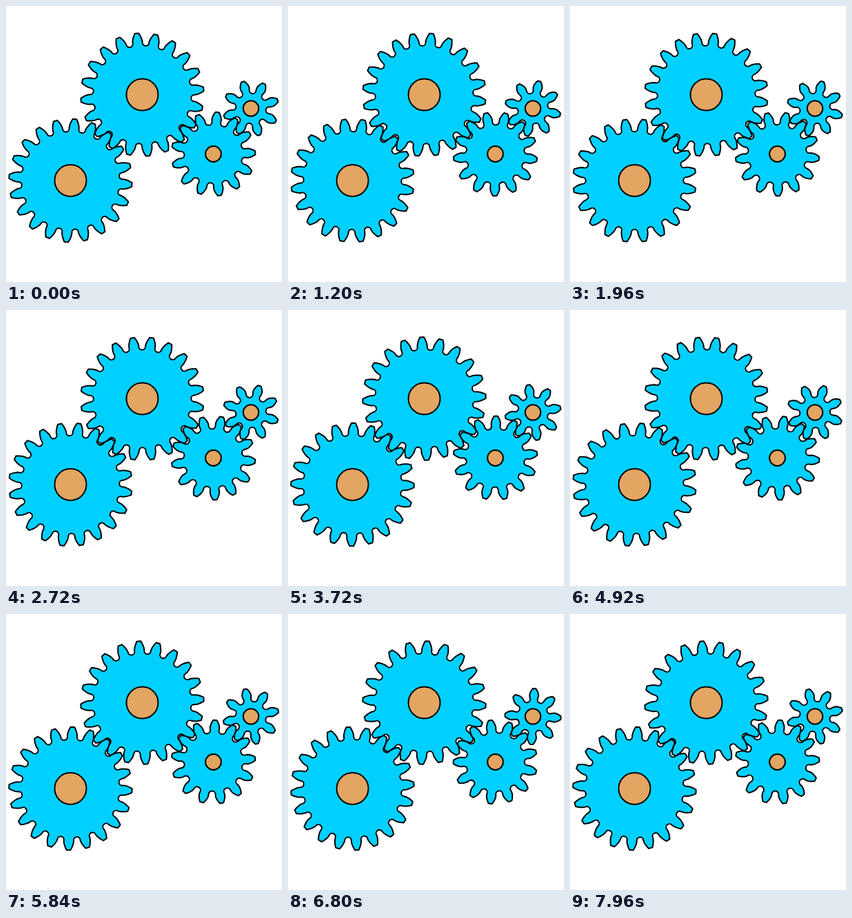
An HTML page that plays this animation: 400x400 px, repeating every 8 s.

```html
<!DOCTYPE html>
<html lang="en">
<head>
<meta charset="utf-8">
<title>Gear train</title>
<style>
  html, body { margin: 0; width: 100%; height: 100%; overflow: hidden; background: #fff; }
  svg { display: block; width: 100%; height: 100%; }
</style>
</head>
<body>
<svg id="stage" viewBox="0 0 400 400" stroke="#000" stroke-width="2" stroke-linejoin="round"></svg>
<script>
const STEP = 40, STEPS = 200;
const MODULE = 8.11, PRESSURE = Math.PI / 9;
const DRIVE_TEETH = 20; // this gear turns one degree per step

// phase: clockwise degrees from straight up to a tooth at time zero
const gears = [
  { x: 93.5, y: 253, teeth: 20, hub: 23, phase: 3.9, dir: -1 },
  { x: 197.5, y: 128.5, teeth: 20, hub: 23, phase: -5.2, dir: 1 },
  { x: 300.5, y: 214.5, teeth: 13, hub: 11.4, phase: 5.4, dir: -1 },
  { x: 355, y: 148.5, teeth: 8, hub: 11.2, phase: 28, dir: 1 }
];

const involute = a => Math.tan(a) - a;

function gearPath(n) {
  const pitch = MODULE * n / 2;
  const base = pitch * Math.cos(PRESSURE);
  const tip = pitch + MODULE;
  const valley = pitch - 1.25 * MODULE + 4.7;
  const start = Math.max(base, valley);
  const half = r => Math.PI / (2 * n) + involute(PRESSURE)
    - (r > base ? involute(Math.acos(base / r)) : 0);
  const point = (r, a) => (r * Math.sin(a)).toFixed(2) + ' ' + (-r * Math.cos(a)).toFixed(2);

  const flank = [[valley, half(valley)]];
  for (let i = 0; i <= 6; i++) {
    const r = start + (tip - start) * i / 6;
    flank.push([r, half(r)]);
  }

  const chord = valley * Math.sin(Math.PI / n - half(valley));
  let d = '';
  for (let k = 0; k < n; k++) {
    const mid = 2 * Math.PI * k / n;
    const rise = flank.map(([r, h]) => point(r, mid - h));
    const fall = flank.map(([r, h]) => point(r, mid + h)).reverse();
    d += k ? `A${chord} ${chord} 0 0 0 ${rise[0]}` : `M${rise[0]}`;
    d += 'L' + rise.slice(1).concat(fall).join('L');
  }
  return d + `A${chord} ${chord} 0 0 0 ${point(valley, -half(valley))}Z`;
}

const stage = document.getElementById('stage');

function add(tag, attrs) {
  const el = document.createElementNS(stage.namespaceURI, tag);
  for (const key in attrs) el.setAttribute(key, attrs[key]);
  return stage.appendChild(el);
}

for (const g of gears) {
  g.wheel = add('path', { d: gearPath(g.teeth), fill: '#00d0ff' });
  add('circle', { cx: g.x, cy: g.y, r: g.hub, fill: '#e2a562' });
}

function draw(ms) {
  const step = Math.floor(ms / STEP) % STEPS;
  for (const g of gears) {
    const angle = g.phase + g.dir * step * DRIVE_TEETH / g.teeth;
    g.wheel.setAttribute('transform', `translate(${g.x} ${g.y}) rotate(${angle})`);
  }
}

const origin = performance.now();
function tick() {
  draw(performance.now() - origin);
  requestAnimationFrame(tick);
}
tick();
</script>
</body>
</html>
```
